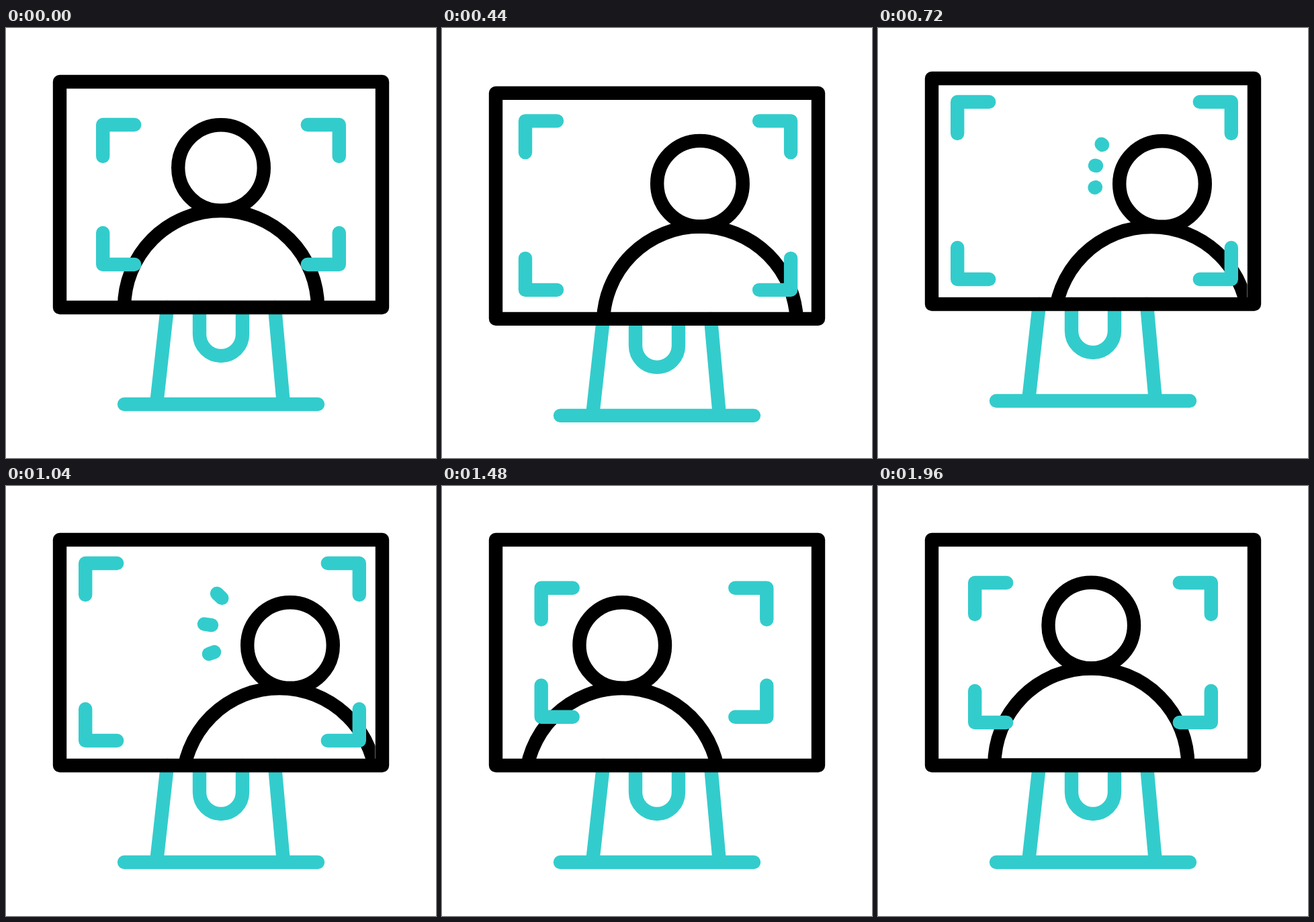
An HTML page that plays this animation: 640 by 640 pixels, repeating every 2000 ms.

```html
<!DOCTYPE html>
<html lang="en">
<head>
<meta charset="utf-8">
<title>Video call</title>
<style>
  html, body { margin: 0; height: 100%; overflow: hidden; background: #fff; }
  svg { display: block; width: 100%; height: 100%; }
  path, circle, rect { fill: none; stroke: #000; stroke-width: 20.4; stroke-linecap: round; stroke-linejoin: round; }
  .teal { stroke: #3cc; }
</style>
</head>
<body>
<svg viewBox="0 0 640 640">
  <clipPath id="screen"><rect x="85" y="80" width="464.5" height="336"/></clipPath>
  <g id="monitor">
    <path class="teal" d="M240 416L224 560M400 416L413 560M176 560H464M288 416V456A32 32 0 0 0 352 456V416"/>
    <g clip-path="url(#screen)">
      <path id="body" d="M176 416A144 144 0 0 1 464 416Z"/>
      <circle id="head" cx="320" cy="208" r="63.8"/>
    </g>
    <rect x="80" y="80" width="480" height="336"/>
    <path id="brackets" class="teal"/>
    <path id="voice" class="teal"/>
  </g>
</svg>
<script>
const LOOP = 2000, ARM = 47;
const el = id => document.getElementById(id);
const monitor = el('monitor'), body = el('body'), head = el('head');
const brackets = el('brackets'), voice = el('voice');

const move = (node, x, y) => node.setAttribute('transform', `translate(${x} ${y})`);

// Focus corners around a centre with half sizes w and h
function focusPath(cx, cy, w, h) {
  let d = '';
  for (const sx of [-1, 1])
    for (const sy of [-1, 1])
      d += `M${cx + sx * (w - ARM)} ${cy + sy * h}h${sx * ARM}v${-sy * ARM}`;
  return d;
}

// Three strokes fanning out from the mouth, visible between tail and tip (0..1)
function voicePath(tail, tip) {
  if (tip <= 0 || tail >= 1) return '';
  const stroke = (x, y, dx, dy) =>
    `M${x + dx * tail} ${y + dy * tail}L${x + dx * tip} ${y + dy * tip}`;
  return stroke(334, 179, -20, -19) + stroke(325, 210, -30, -4.5) + stroke(324, 242, -22, 8);
}

function draw(t) {
  // Eased progress from 0 to 1 between two times
  const ease = (from, to) => {
    const s = Math.min(1, Math.max(0, (t - from) / (to - from)));
    return s * s * (3 - 2 * s);
  };

  // The monitor dips, rebounds and settles
  move(monitor, 0, 28.5 * ease(80, 320) - 36.3 * ease(320, 640) + 7.8 * ease(640, 840));

  // The person goes right and down, leans, crosses left, then returns
  const x = 87 * ease(80, 625) - 153.5 * ease(1080, 1576) + 66.5 * ease(1680, 2000);
  const y = 29 * ease(350, 640) - 29.6 * ease(1680, 1950) + 0.6 * ease(1950, 2000);
  const lean = 16 * (ease(480, 700) - ease(1060, 1240));
  move(body, x, y);
  move(head, x + lean, y);

  // The focus area widens, narrows, then rests
  const grow = 28 * ease(80, 600) - 36 * ease(1080, 1410) + 8 * ease(1680, 1920);
  const drift = 2 * ease(80, 600) - 6.5 * ease(1080, 1410) + 4.5 * ease(1600, 1920);
  brackets.setAttribute('d',
    focusPath(320 + drift, 248 - Math.abs(grow) / 28, 175.8 + grow, 104 + grow));

  voice.setAttribute('d', voicePath(ease(880, 1152), ease(680, 935)));
}

function frame() {
  draw(performance.now() % LOOP);
  requestAnimationFrame(frame);
}
frame();
</script>
</body>
</html>
```
